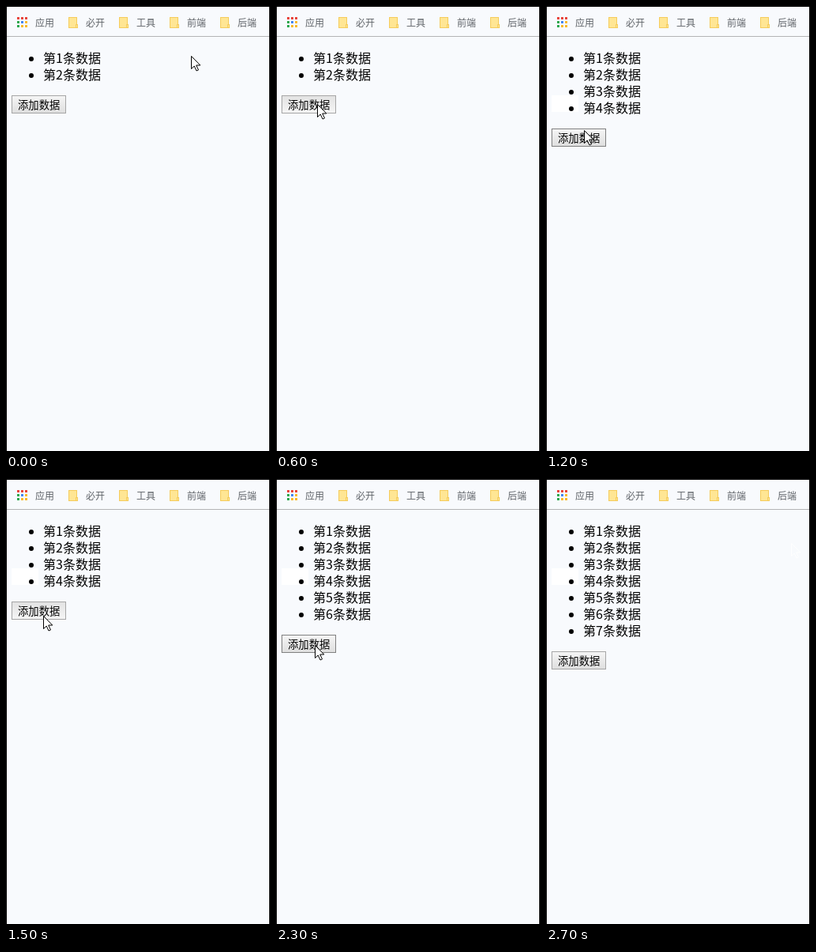
An HTML page with a canvas that plays this animation: 334 px wide and 563 px high, repeating every 3.2 s.

```html
<!DOCTYPE html>
<html lang="zh-CN">
<head>
<meta charset="utf-8">
<style>
  html, body { margin: 0; width: 100%; height: 100%; overflow: hidden; background: #f8fafd; }
  canvas { display: block; }
</style>
</head>
<body>
<canvas id="stage" width="334" height="563"></canvas>
<script>
const ctx = document.getElementById('stage').getContext('2d');
const LOOP = 3200, STEP = 100, ROW = 21, PAGE = '#f8fafd';
const FONT = '"Noto Sans CJK SC", "Noto Sans CJK", "Noto Sans", sans-serif';

// The button is clicked at a steady pace and held briefly before each click
const FIRST_CLICK = 700, CLICK_GAP = 450, HOLD = 150, MAX_CLICKS = 5;

// Key poses of the pointer: time, x, y
const poses = [
  [0, 235, 64], [600, 53, 125], [900, 50, 142], [1500, 48, 174],
  [1900, 49, 185], [2300, 50, 211], [2500, 50, 211], [2700, 311, 82]
];

function rect(x, y, w, h, fill) {
  ctx.fillStyle = fill;
  ctx.fillRect(x, y, w, h);
}

function text(str, x, y, size, fill = '#000') {
  ctx.font = `350 ${size}px ${FONT}`;
  ctx.fillStyle = fill;
  ctx.fillText(str, x, y);
}

function pointerAt(t) {
  const i = poses.findIndex(p => p[0] > t);
  if (i < 0) return poses[poses.length - 1].slice(1);
  const [t0, x0, y0] = poses[i - 1], [t1, x1, y1] = poses[i];
  const k = (t - t0) / (t1 - t0);
  return [Math.round(x0 + (x1 - x0) * k), Math.round(y0 + (y1 - y0) * k)];
}

function drawAppsIcon() {
  for (let row = 0; row < 3; row++) {
    for (let col = 0; col < 3; col++) {
      const color = row === 0 ? '#e8453c' : col === 0 ? '#2da94f'
        : row === 1 && col === 1 ? '#4688f1' : '#f9bb2d';
      rect(14 + col * 5, 14 + row * 5, 3, 3, color);
    }
  }
}

function drawFolder(x) {
  rect(x, 14, 11, 14, '#f5cc5c');
  rect(x + 1, 15, 9, 12, '#ffe694');
  rect(x + 9, 23, 3, 5, '#f5cc5c');
  rect(x + 10, 24, 1, 3, '#ffe694');
}

function drawToolbar() {
  drawAppsIcon();
  ['应用', '必开', '工具', '前端', '后端'].forEach((label, i) => {
    if (i) drawFolder(15 + i * 64);
    text(label, 37 + i * 64, 26, 12, '#5f6368');
  });
  rect(0, 38, 334, 1, '#b3b4b6');
}

function drawList(count) {
  for (let i = 0; i < count; i++) {
    ctx.fillStyle = '#000';
    ctx.beginPath();
    ctx.arc(32, 67 + i * ROW, 3, 0, Math.PI * 2);
    ctx.fill();
    text(`第${i + 1}条数据`, 47, 72 + i * ROW, 16);
  }
}

function drawButton(y, pressed, hover) {
  const shade = ctx.createLinearGradient(0, y, 0, y + 23);
  shade.addColorStop(0, pressed ? '#e2e2e2' : '#f6f6f6');
  shade.addColorStop(1, pressed ? '#f6f6f6' : '#dedede');
  rect(7, y, 69, 23, hover && !pressed ? '#808080' : '#a6a6a6');
  rect(8, y + 1, 67, 21, shade);
  text('添加数据', 15, y + 17, 13.333);
}

function drawPointer(x, y, faded) {
  ctx.save();
  ctx.translate(x - 0.5, y - 0.5);
  const arrow = new Path2D('M0 0V16L3.7 12.5L6.5 18.5L9 17.4L6.2 11.5H11.3Z');
  ctx.fillStyle = faded ? PAGE : '#fff';
  ctx.strokeStyle = faded ? '#fff' : '#000';
  ctx.fill(arrow);
  ctx.stroke(arrow);
  ctx.restore();
}

function draw() {
  const t = Math.floor(performance.now() % LOOP / STEP) * STEP;
  const due = Math.floor((t - FIRST_CLICK) / CLICK_GAP) + 1;
  const clicks = Math.max(0, Math.min(MAX_CLICKS, due));
  const nextClick = FIRST_CLICK + clicks * CLICK_GAP;
  const pressed = clicks < MAX_CLICKS && nextClick - t <= HOLD;
  const top = 113 + clicks * ROW;
  const [x, y] = pointerAt(t);
  const hover = x < 76 && y >= top && y < top + 23;

  rect(0, 0, 334, 563, PAGE);
  drawToolbar();
  if (clicks) rect(7, 113, 34, ROW, '#fff');
  drawList(2 + clicks);
  drawButton(top, pressed, hover);
  drawPointer(x, y, t >= 2700);
  rect(0, 0, 334, 1, '#000');
  rect(0, 0, 1, 563, '#000');
  rect(333, 0, 1, 563, '#000');
  requestAnimationFrame(draw);
}
draw();
</script>
</body>
</html>
```
